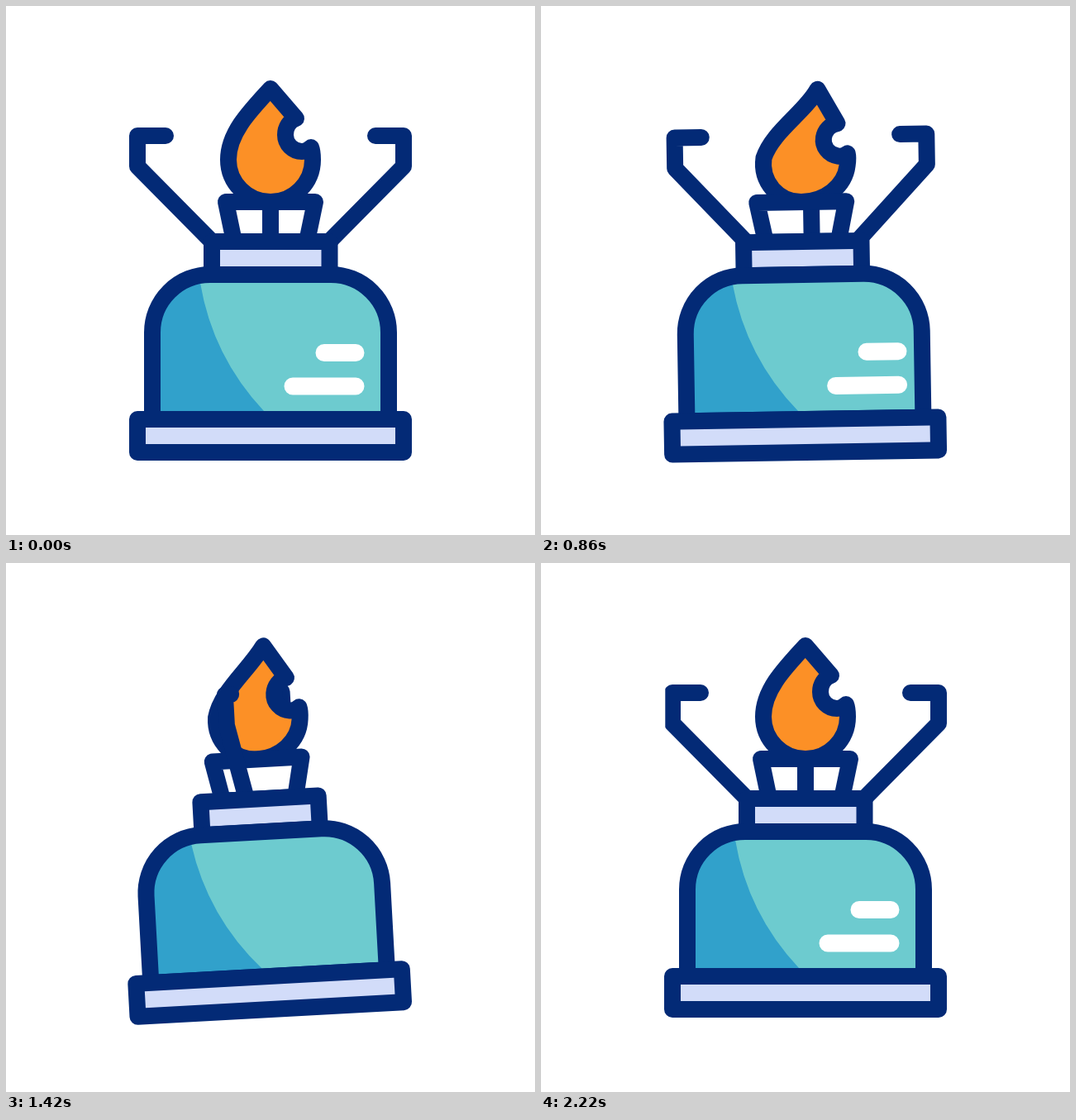
These frames come from a looping animation (640 px wide and 640 px high, 2.4 s). An HTML page with a canvas:

```html
<!DOCTYPE html>
<html lang="en">
<head>
<meta charset="utf-8">
<title>Camping stove</title>
<style>
  html, body { margin: 0; width: 100%; height: 100%; overflow: hidden; background: #fff; }
  canvas { display: block; width: 640px; height: 640px; }
</style>
</head>
<body>
<canvas id="stage"></canvas>
<script>
const LOOP = 2400, SIZE = 640, PIVOT = 535, RAD = Math.PI / 180;
const NAVY = '#032a76', ORANGE = '#fc9026', TEAL = '#6dcbcf', BLUE = '#31a1cb', PALE = '#d2dcf9';

const canvas = document.getElementById('stage');
const ctx = canvas.getContext('2d');
const dpr = window.devicePixelRatio || 1;
canvas.width = canvas.height = SIZE * dpr;

// Tracks are lists of [time, value].
const TILT = [[200, 0], [720, -6.3], [1110, 12.3], [1510, -5.2], [1900, 0]];
const BEND = [[200, 0], [720, 48.5], [1110, -45], [1510, 23], [1900, 0]];
const YAW = [[200, 0], [360, -24], [660, -38], [1000, 3], [1110, 22], [1420, 77.5], [1760, 127], [2210, 180]];
const ROLL = [[200, 0], [360, -9.5], [650, -21], [1000, 49], [1420, 230], [1760, 412], [2210, 500]];
const TURN = 500;

function segment(keys, t) {
  let i = 0;
  while (i < keys.length - 2 && t > keys[i + 1][0]) i++;
  const span = keys[i + 1][0] - keys[i][0];
  const u = Math.min(1, Math.max(0, (t - keys[i][0]) / span));
  return { i, u, span, a: keys[i][1], b: keys[i + 1][1] };
}

// Sine ease between neighbouring keys
function swing(keys, t) {
  const { u, a, b } = segment(keys, t);
  return a + (b - a) * (1 - Math.cos(Math.PI * u)) / 2;
}

// Monotone cubic through all keys
function glide(keys, t) {
  const { i, u, span, a, b } = segment(keys, t);
  const slope = j => (keys[j + 1][1] - keys[j][1]) / (keys[j + 1][0] - keys[j][0]);
  const tangent = j => {
    if (j === 0 || j === keys.length - 1) return 0;
    const p = slope(j - 1), q = slope(j);
    return p * q > 0 ? 2 * p * q / (p + q) : 0;
  };
  const u2 = u * u, u3 = u2 * u, s = 3 * u2 - 2 * u3;
  return a + (b - a) * s
    + span * (tangent(i) * (u3 - 2 * u2 + u) + tangent(i + 1) * (u3 - u2));
}

function paint(path, fill, stroke = NAVY, width = 20) {
  if (fill) { ctx.fillStyle = fill; ctx.fill(path); }
  if (stroke) { ctx.strokeStyle = stroke; ctx.lineWidth = width; ctx.stroke(path); }
}

function within(clip, draw) {
  ctx.save();
  ctx.clip(clip);
  draw();
  ctx.restore();
}

const BASE = new Path2D('M159 500H481V540H159Z');
const BODY = new Path2D('M177 500V395A70 70 0 0 1 247 325H393A70 70 0 0 1 463 395V500Z');
const SHADE = new Path2D('M160 320H232L235 335Q250 424 312 490L320 500H160Z');
const COLLAR = new Path2D('M249 285H391.5V325H249Z');
const BURNER = new Path2D('M276 285L266 237H374L364 285Z');

function arm(scale, trimLeft) {
  const x = d => 320 + d * scale;
  const p = new Path2D(`M${x(127)} 157H${x(161)}V194L${x(71)} 285`);
  if (!trimLeft) return paint(p);
  const clip = new Path2D();
  clip.rect(x(161) - 8.7, 100, 400, 220);
  within(clip, () => paint(p));
}

// Bends a flame point (x from the axis, h above the foot) sideways.
function bent(x, h, d) {
  const r = h / 137;
  const rise = x * 1.45 / 137 * Math.pow(r, .45);
  let nx = x + d * Math.pow(r, 1.45);
  let y = 237 - h + .0022 * d * d * r * r;
  if (x < 0) {
    // the left flank is pinched into a neck on either side
    nx += 2.4 * Math.abs(d) * Math.pow(r, 4);
    y += rise * (.9 * d - .5 * Math.abs(d));
  } else {
    y += rise * d;
    if (x > 0 && d < 0) {
      const w = Math.min(1, h / 66);
      nx += x * d * .0065 * w;
      y += d * .15 * w * Math.min(1, x / 30);
    }
  }
  return [320 + nx, y];
}

function flame(d) {
  const p = new Path2D();
  const at = (x, h) => bent(x, h, d);
  const curve = (a, b, c, e, f, g) => p.bezierCurveTo(...at(a, b), ...at(c, e), ...at(f, g));
  p.moveTo(...at(0, 137));
  p.lineTo(...at(31, 101));
  curve(23, 98, 18, 90, 18, 81);
  curve(18, 70, 27, 61, 38, 61);
  curve(42, 61, 46, 63, 49, 66);
  curve(51, 61, 51, 56, 51, 51);
  curve(51, 23, 28, 0, 0, 0);
  curve(-28, 0, -51, 23, -51, 51);
  curve(-51, 82, -28, 107, 0, 137);
  p.closePath();
  paint(p, ORANGE);
}

function draw(t) {
  const yaw = glide(YAW, t);
  const lag = yaw > 90 ? -2.5 * Math.sin(2 * yaw * RAD) : 0;
  let roll = glide(ROLL, t);
  if (roll > 200) roll -= TURN;

  ctx.setTransform(dpr, 0, 0, dpr, 0, 0);
  ctx.fillStyle = '#fff';
  ctx.fillRect(0, 0, SIZE, SIZE);
  ctx.lineCap = ctx.lineJoin = 'round';
  ctx.translate(320, PIVOT);
  ctx.rotate(swing(TILT, t) * RAD);
  ctx.translate(-320, -PIVOT);

  arm(Math.cos((yaw + lag) * RAD), yaw > 90);
  flame(swing(BEND, t));
  paint(BURNER, '#fff', null);
  within(BURNER, () => paint(new Path2D(`M${320 + roll * 1.08} 237V285`)));
  paint(BURNER);
  arm(-Math.cos((yaw - lag) * RAD), false);

  paint(COLLAR, PALE);
  paint(BODY, TEAL, null);
  within(BODY, () => {
    paint(SHADE, BLUE, null);
    paint(new Path2D(`M${385 + roll} 419.5h38M${347 + roll} 460h76`), null, '#fff', 21);
  });
  paint(BODY);
  paint(BASE, PALE);
}

function tick(now) {
  draw(now % LOOP);
  requestAnimationFrame(tick);
}
draw(0);
requestAnimationFrame(tick);
</script>
</body>
</html>
```
